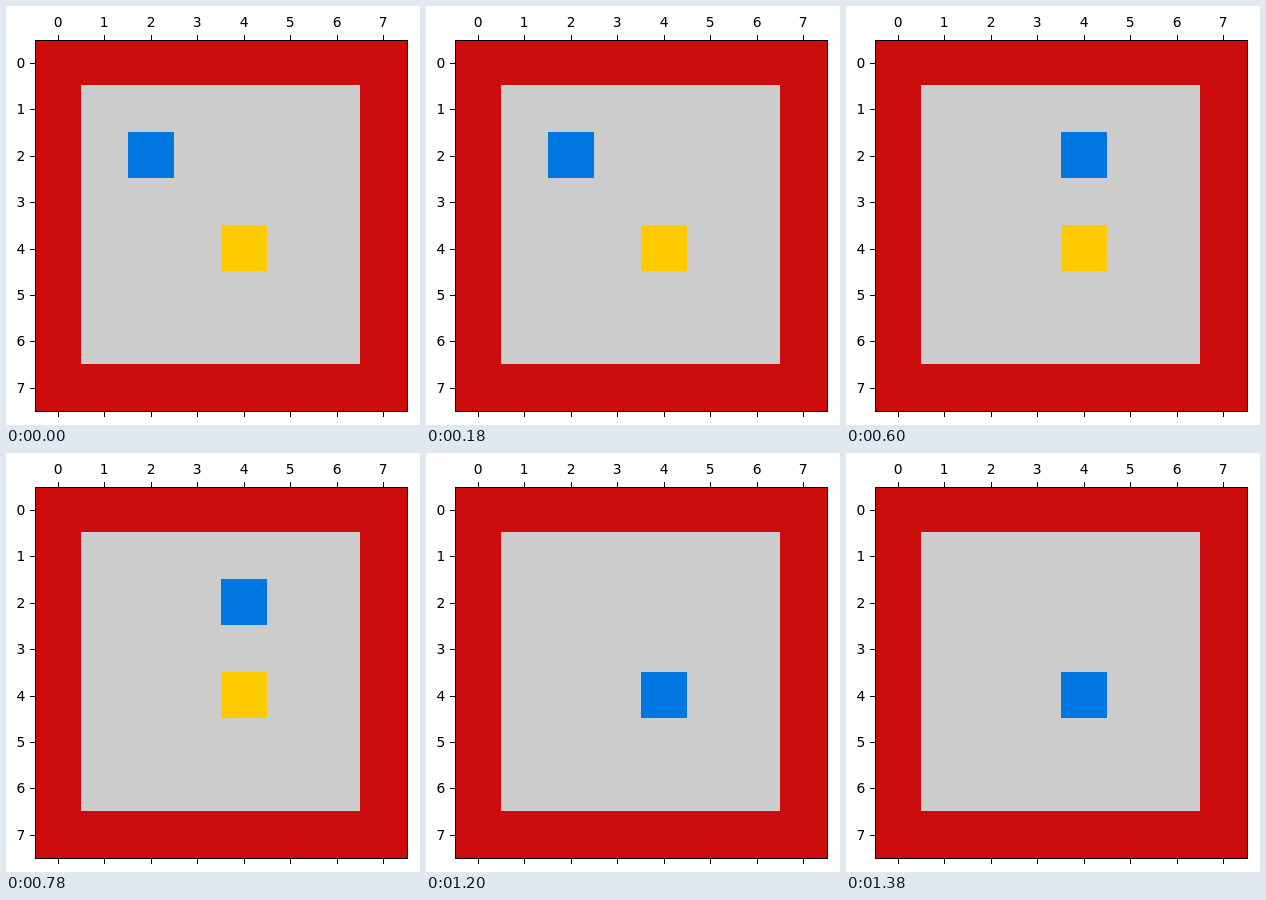
Animation of 414 by 419 pixels, one loop 1500 ms. Source, as an HTML page:

```html
<!DOCTYPE html>
<html lang="en">
<head>
<meta charset="utf-8">
<title>Grid walk</title>
<style>
  html, body { margin: 0; width: 100%; height: 100%; overflow: hidden; background: #fff; }
  svg { display: block; width: 414px; height: 419px; }
  text { font: 13.89px "DejaVu Sans", Verdana, sans-serif; fill: #000; }
</style>
</head>
<body>
<svg id="stage" viewBox="0 0 414 419" shape-rendering="crispEdges"></svg>
<script>
const stage = document.getElementById("stage");
const SIZE = 8;
const STEP_MS = 300;
const PATH = [[2, 2], [3, 2], [4, 2], [4, 3], [4, 4]];

// Pixel edges of the cells
const edgeX = i => Math.round(28.7 + 46.5 * i);
const edgeY = i => Math.round(32.9 + 46.5 * i);

function add(tag, attrs, text = "") {
  const el = document.createElementNS("http://www.w3.org/2000/svg", tag);
  setAttrs(el, attrs);
  el.textContent = text;
  stage.append(el);
  return el;
}

function setAttrs(el, attrs) {
  for (const key in attrs) el.setAttribute(key, attrs[key]);
}

const rect = (x, y, width, height, fill) => add("rect", { x, y, width, height, fill });

function cells(col, row, span = 1) {
  const x = edgeX(col), y = edgeY(row);
  return { x, y, width: edgeX(col + span) - x, height: edgeY(row + span) - y };
}

rect(29, 34, 372, 371, "#cc0c0c");
add("rect", { ...cells(1, 1, 6), fill: "#cccccc" });
add("rect", { ...cells(4, 4), fill: "#ffcb00" });
const walker = add("rect", { ...cells(2, 2), fill: "#0077e0" });

add("rect", { x: 29.5, y: 34.5, width: 372, height: 371, fill: "none", stroke: "#000" });

for (let i = 0; i < SIZE; i++) {
  const x = Math.round(51.95 + 46.5 * i);
  const y = Math.round(56.8 + 46.44 * i);
  rect(x, 29, 1, 5, "#000");
  rect(x, 406, 1, 5, "#000");
  rect(24, y, 5, 1, "#000");
  add("text", { x: x + 0.2, y: 21, "text-anchor": "middle" }, i);
  add("text", { x: 19.3, y: y + 5, "text-anchor": "end" }, i);
}

const start = performance.now();

function draw() {
  const step = Math.floor((performance.now() - start) / STEP_MS) % PATH.length;
  setAttrs(walker, cells(...PATH[step]));
  requestAnimationFrame(draw);
}
draw();
</script>
</body>
</html>
```
